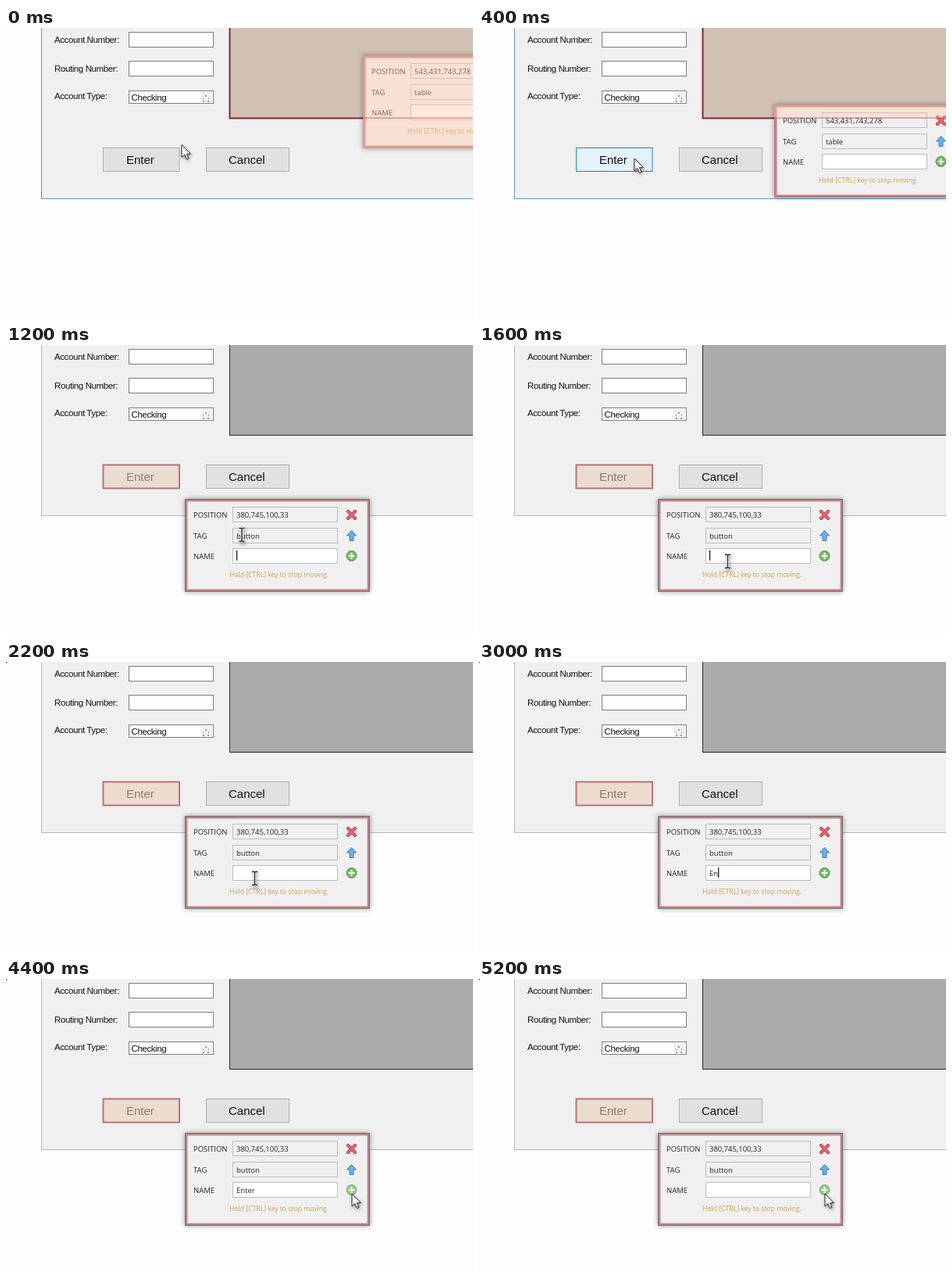
An HTML page that plays this animation: 598x370 px, repeating every 5.8 s.

```html
<!DOCTYPE html>
<html lang="en">
<head>
<meta charset="utf-8">
<title>Naming a button</title>
<style>
  html, body { margin: 0; width: 100%; height: 100%; overflow: hidden; background: #fdfdfd; }
  svg { display: block; width: 598px; height: 370px; }
  .form { font: 11.5px "Liberation Sans", Arial, sans-serif; letter-spacing: -.4px; fill: #111; }
  .btn { font: 15px "Liberation Sans", Arial, sans-serif; fill: #111; }
  .tip { font: 9.5px "Open Sans", "Noto Sans", sans-serif; fill: #222; }
  .hint { font-size: 8.65px; fill: #c9a24f; }
  .field { fill: #fff; stroke: #7d7d7d; }
  .tip .field { stroke: #bcbcbc; }
  .tip .locked { fill: #f0f0f0; }
  .face { fill: #e1e1e1; stroke: #adadad; }
  .hover { fill: #e5f1fb; stroke: #2f78b7; }
  .pick { fill: #eee4dc; stroke: #a8707f; stroke-width: 2; }
  .picked { fill: #ebdccf; stroke: #b8737b; stroke-width: 2; }
  .grid { fill: #ababab; stroke: #2a2a2a; }
  .grid.on { fill: #d1c1b4; stroke: #792b3a; stroke-width: 2; }
  #popup, #arrow, #beam { filter: drop-shadow(1px 2px 2px rgba(0, 0, 0, .4)); }
  #popup { filter: drop-shadow(0 0 3px rgba(0, 0, 0, .4)); }
</style>
</head>
<body>
<svg viewBox="0 0 598 370">
  <rect id="win" x="45.5" y="-5" width="600" height="223.5" fill="#f0f0f0"/>
  <g class="form">
    <text x="62" y="19">Account Number:</text>
    <text x="62" y="56">Routing Number:</text>
    <text x="62" y="91">Account Type:</text>
    <rect class="field" x="157.5" y="5.5" width="108" height="19"/>
    <rect class="field" x="157.5" y="42.5" width="108" height="19"/>
    <rect class="field" x="157.5" y="80.5" width="108" height="16"/>
    <rect x="249" y="82" width="15" height="13" fill="#f0f0f0"/>
    <path d="M255 87h2M252 90h1M259 90h1M252 94h2M258 94h2" stroke="#444"/>
    <text x="160.5" y="93">Checking</text>
  </g>
  <rect id="grid" x="286.5" y="-5" width="330" height="120.5"/>
  <g class="btn">
    <rect id="enter" x="124.5" y="153.5" width="97.5" height="30"/>
    <text id="enterText" x="154" y="174">Enter</text>
    <rect class="face" x="256.5" y="153.5" width="106" height="30"/>
    <text x="285" y="174">Cancel</text>
  </g>

  <g id="popup" class="tip">
    <rect width="237" height="119" id="rim"/>
    <rect x="2.5" y="2.5" width="232" height="114" fill="#f0f0f0" id="rim2" stroke-width="2"/>
    <rect class="field locked" x="61.5" y="10.5" width="134" height="19"/>
    <rect class="field locked" x="61.5" y="37.5" width="134" height="19"/>
    <rect class="field" x="61.5" y="63.5" width="134" height="19"/>
    <text x="11" y="24">POSITION</text>
    <text x="11" y="51">TAG</text>
    <text x="11" y="77">NAME</text>
    <text id="pos" x="66" y="24"></text>
    <text id="tag" x="66" y="51"></text>
    <text id="name" x="66" y="77"></text>
    <rect id="caret" y="66" width="1.2" height="13" fill="#111"/>
    <text class="hint" x="57" y="100">Hold [CTRL] key to stop moving.</text>
    <path d="M209 16l9 9M218 16l-9 9" stroke="#c43a48" stroke-width="4.2" stroke-linecap="round"/>
    <path d="M209 16l9 9M218 16l-9 9" stroke="#e56a74" stroke-width="2.2" stroke-linecap="round"/>
    <path d="M213.500 40.500l6 6.500h-3.500v6.500h-5v-6.500h-3.500z" fill="#6cafe6" stroke="#3f80bd" stroke-linejoin="round"/>
    <g id="plus">
      <circle cx="213.500" cy="73" r="6.500" fill="#74b965" stroke="#4f9644"/>
      <path d="M213.500 69v8M209.500 73h8" stroke="#fff" stroke-width="2"/>
    </g>
    <rect id="wash" width="237" fill="#ffc9ad" fill-opacity=".42"/>
    <rect id="seam" width="237" height="1.5" fill="#c0505c" fill-opacity=".55"/>
  </g>

  <path id="arrow" d="M.5 .5v16l3.800-3.500 2.700 6 2.500-1.100-2.600-5.700h5z" fill="#fff" stroke="#222"/>
  <g id="beam" fill="none">
    <path d="M-3.500-8.500h2.500l1 1 1-1h2.500M0-8V8M-3.500 8.500h2.500l1-1 1 1h2.500" stroke="#fff" stroke-width="3"/>
    <path d="M-3.500-8.500h2.500l1 1 1-1h2.500M0-8V8M-3.500 8.500h2.500l1-1 1 1h2.500" stroke="#222" stroke-width="1.400"/>
  </g>
  <rect id="dot" width="1" height="1"/>
</svg>
<script>
const LOOP = 5800;
const $ = id => document.getElementById(id);
const show = (id, on) => $(id).setAttribute('visibility', on ? 'visible' : 'hidden');
const set = (id, attrs) => {
  for (const k in attrs) $(id).setAttribute(k, attrs[k]);
};

// Each step changes only the listed parts of the scene.
const steps = [
  [0, { arrow: [224.5, 149], beam: null, popup: [457, 35], onGrid: true, enter: 'face', wash: 119,
        active: false, caret: false, name: '', dot: false, plus: 1 }],
  [200, { arrow: [198.5, 166.5], popup: [378, 98], wash: 17 }],
  [400, { enter: 'hover' }],
  [600, { popup: [229, 197], onGrid: false, enter: 'pick', wash: 0 }],
  [800, { arrow: [428, 259] }],
  [1000, { arrow: null, beam: [311, 253], active: true }],
  [1200, { beam: [302, 243], enter: 'picked', caret: true }],
  [1400, { beam: [367, 281] }],
  [1600, { beam: [318.5, 277] }],
  [2000, { dot: true }],
  [2200, { caret: false }],
  [2600, { beam: null }],
  [2800, { name: 'E', caret: true }],
  [3000, { name: 'En' }],
  [3200, { name: 'Ente' }],
  [3400, { name: 'Enter' }],
  [3800, { beam: [391.5, 277] }],
  [4000, { beam: null, arrow: [422, 273] }],
  [4200, { arrow: [442.5, 274.5], plus: .75 }],
  [4400, { caret: false }],
  [4600, { caret: true }],
  [5000, { caret: false }],
  [5200, { name: '' }]
];

function place(id, at) {
  show(id, at);
  if (at) set(id, { transform: `translate(${at})` });
}

function draw(s) {
  set('win', { stroke: s.active ? '#b4b6ba' : '#5d97cc' });
  set('grid', { class: s.onGrid ? 'grid on' : 'grid' });
  set('enter', { class: s.enter });
  const chosen = s.enter.startsWith('pick');
  $('enterText').style.fill = chosen ? '#8b7c72' : '#111';

  place('popup', s.popup);
  set('rim', { fill: s.active ? '#777' : chosen ? '#a0757a' : '#b97a7e' });
  set('rim2', { stroke: s.active ? '#d3868b' : '#cf7f85' });
  $('pos').textContent = s.onGrid ? '543,431,743,278' : '380,745,100,33';
  $('tag').textContent = s.onGrid ? 'table' : 'button';
  $('name').textContent = s.name;
  set('caret', { x: 66 + (s.name ? $('name').getComputedTextLength() : 0) });
  show('caret', s.caret);
  set('plus', { opacity: s.plus });
  set('wash', { height: s.wash });
  set('seam', { y: 114.5 - s.popup[1] });
  show('seam', s.onGrid);

  place('arrow', s.arrow);
  place('beam', s.beam);
  show('dot', s.dot);
}

let last = -1;
const start = performance.now();
function tick() {
  const t = (performance.now() - start) % LOOP;
  const past = steps.filter(([at]) => at <= t);
  if (past.length !== last) {
    last = past.length;
    draw(Object.assign({}, ...past.map(([, change]) => change)));
  }
  requestAnimationFrame(tick);
}
tick();
</script>
</body>
</html>
```
